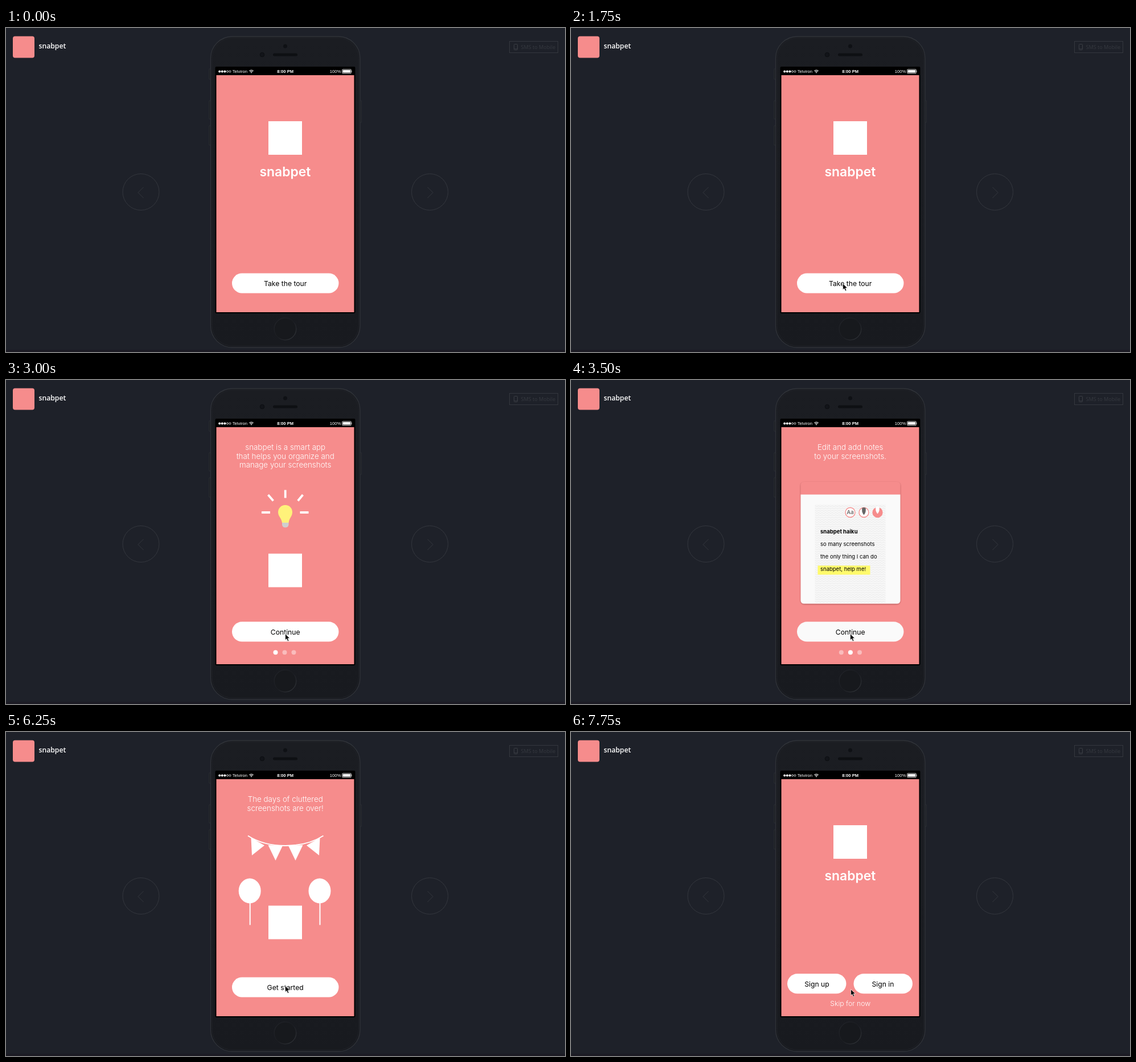
Write an HTML page that moves like this. It is 982x570 px and loops after 8 s.

```html
<!DOCTYPE html>
<html lang="en">
<head>
<meta charset="utf-8">
<title>App tour prototype</title>
<style>
  html, body { margin: 0; width: 100%; height: 100%; overflow: hidden; background: #1e2129; }
  svg { display: block; width: 100%; height: 100%; }

  .label { font: 600 12.2px "Open Sans", sans-serif; fill: #fff; }
  .faint { font: 9.1px "Open Sans", sans-serif; fill: #373a41; }
  .status { font: 7.6px "Liberation Sans", Arial, sans-serif; fill: #fff; }
  .mid { text-anchor: middle; }
  .title, .lead, .btn, .note { font-family: Inter, Montserrat, sans-serif; }
  .title { font-size: 22.9px; font-weight: 600; fill: #fff; text-anchor: middle; }
  .lead { font-size: 13.4px; font-weight: 300; fill: #fff; text-anchor: middle; }
  .btn { font-size: 12.2px; fill: #000; text-anchor: middle; }
  .note { font-size: 9.5px; fill: #000; }
  .bold { font-weight: 700; }

  .outline { fill: none; stroke: #34373e; }
  .white { fill: #fff; }
  .pink { fill: #f68c8c; }
  .paper { fill: #fafafa; }
  .pale { fill: #fff; opacity: .42; }

  .screen, #cursor { animation: 8s step-end infinite; }
  .screen { visibility: hidden; }
  #welcome { animation-name: welcome; }
  #smart { animation-name: smart; }
  #edit { animation-name: edit; }
  #search { animation-name: search; }
  #party { animation-name: party; }
  #sign { animation-name: sign; }
  #cursor { animation-name: cursor; }

  @keyframes welcome { 0% { visibility: visible } 28.125%, 100% { visibility: hidden } }
  @keyframes smart { 0% { visibility: hidden } 28.125% { visibility: visible } 43.75%, 100% { visibility: hidden } }
  @keyframes edit { 0% { visibility: hidden } 43.75% { visibility: visible } 62.5%, 100% { visibility: hidden } }
  @keyframes search { 0% { visibility: hidden } 62.5% { visibility: visible } 78.125%, 100% { visibility: hidden } }
  @keyframes party { 0% { visibility: hidden } 78.125% { visibility: visible } 96.875%, 100% { visibility: hidden } }
  @keyframes sign { 0% { visibility: hidden } 96.875%, 100% { visibility: visible } }

  /* The pointer is sampled four times a second. */
  @keyframes cursor {
    0% { transform: translate(-30px, -30px) }
    3.125% { transform: translate(819px, 288px) }
    6.25% { transform: translate(750px, 393px) }
    9.375% { transform: translate(601px, 425px) }
    12.5% { transform: translate(502px, 466px) }
    15.625% { transform: translate(482px, 453px) }
    18.75% { transform: translate(482px, 455px) }
    21.875% { transform: translate(477px, 449px) }
    28.125% { transform: translate(487px, 452px) }
    31.25% { transform: translate(488px, 450px) }
    34.375% { transform: translate(489px, 446px) }
    37.5% { transform: translate(490px, 446px) }
    84.375% { transform: translate(490px, 451px) }
    87.5%, 100% { transform: translate(491px, 452px) }
  }
</style>
</head>
<body>
<svg viewBox="0 0 982 570" preserveAspectRatio="none">
  <defs>
    <linearGradient id="body" x2="0" y2="1">
      <stop offset="0" stop-color="#1b1d22"/>
      <stop offset=".5" stop-color="#1a1c21"/>
      <stop offset="1" stop-color="#181a1f"/>
    </linearGradient>
    <linearGradient id="ring" x2="1" y2="1">
      <stop offset="0" stop-color="#24262b"/>
      <stop offset=".5" stop-color="#1b1d22"/>
      <stop offset="1" stop-color="#35383d"/>
    </linearGradient>
    <pattern id="weave" width="6" height="4" patternUnits="userSpaceOnUse">
      <rect width="6" height="4" fill="#f7f7f7"/>
      <path d="M0 3L3 1L6 3" fill="none" stroke="#ececec"/>
    </pattern>
    <filter id="shadow" x="-10%" y="-10%" width="120%" height="120%">
      <feDropShadow dx="0" dy="1" stdDeviation="1.2" flood-color="#5a2020" flood-opacity=".55"/>
    </filter>
    <rect id="pill" x="397" y="431.5" width="187.5" height="35" rx="17.5"/>
    <rect id="badge" x="461" y="164" width="59" height="59" fill="#fff"/>
    <path id="nib" d="M-3 -8Q0 -9.5 3 -8Q4.6 -1 0 4.500Q-4.600 -1 -3 -8Z"/>
    <g id="balloon" class="white">
      <ellipse cx="0" cy="279.5" rx="19.500" ry="22"/>
      <rect x="-.5" y="300" width="2" height="39.500"/>
    </g>
    <g id="half">
      <path d="M430.500 186L454 199.500L432 217Z"/>
      <path d="M460.500 199L486 200L473.500 226Z"/>
    </g>
    <g id="card">
      <rect class="pink" x="403.500" y="179" width="175" height="214.500" rx="6" filter="url(#shadow)"/>
    </g>
  </defs>

  <rect width="982" height="570" fill="#1e2129"/>
  <rect y="566" width="982" height="4" fill="#1c1b24"/>

  <!-- Page controls -->
  <rect class="pink" x="12" y="14.500" width="38" height="38" rx="4"/>
  <text class="label" x="57.500" y="36">snabpet</text>
  <g class="outline">
    <rect x="884.500" y="23.500" width="85" height="20"/>
    <rect x="892.500" y="28.500" width="6" height="10" rx="1" stroke="#3b3e45"/>
    <path d="M893 36.500h5"/>
    <circle cx="237" cy="288.500" r="32"/>
    <path d="M241.500 280L232 289.500L241.500 299"/>
    <circle cx="744.500" cy="288.500" r="32"/>
    <path d="M740.500 280L750 289.500L740.500 299"/>
  </g>
  <text class="faint" x="904.500" y="37">SMS to Mobile</text>

  <!-- Phone -->
  <g fill="#1b1d22" stroke="#2b2e34">
    <path d="M359 72h-2v18h2M359 128h-2v32h2M359 172h-2v34h2M622.500 128h2v38h-2"/>
    <rect x="359.500" y="15" width="262.500" height="547" rx="38" fill="url(#body)" stroke="#303339" stroke-width="1.300"/>
    <rect x="362" y="17.500" width="257.500" height="542" rx="36" fill="none" stroke="#202228"/>
  </g>
  <circle cx="490.500" cy="32" r="3.500" fill="#0f1115"/>
  <circle cx="450" cy="47" r="3.800" fill="#121419" stroke="#0c0e11"/>
  <rect x="469" y="44.500" width="43" height="5" rx="2.500" fill="#0e1013"/>
  <circle cx="490.500" cy="529.500" r="19.300" fill="#17191d" stroke="url(#ring)" stroke-width="1.300"/>
  <rect x="367.500" y="68" width="246" height="434" rx="2"/>
  <rect class="pink" x="369.500" y="83" width="242" height="417"/>

  <!-- Status bar -->
  <g class="white">
    <circle cx="375.200" cy="76.500" r="2"/>
    <circle cx="379.800" cy="76.500" r="2"/>
    <circle cx="384.400" cy="76.500" r="2"/>
    <path d="M431 79.300m-1.300-1.300a1.900 1.900 0 0 1 2.600 0l-1.300 1.600z"/>
  </g>
  <g fill="none" stroke="#fff" stroke-width=".8">
    <circle cx="389" cy="76.500" r="1.600"/>
    <circle cx="393.400" cy="76.500" r="1.600"/>
    <path d="M427.500 75.500a5 5 0 0 1 7 0M428.800 77a3.200 3.200 0 0 1 4.400 0" stroke-width="1.100"/>
    <rect x="590.500" y="72.800" width="16" height="7" rx="1.500"/>
  </g>
  <rect class="white" x="591.700" y="74" width="13.600" height="4.600" rx=".6"/>
  <path class="white" d="M607.300 75q1.400 1.300 0 2.600z"/>
  <text class="status" x="397.800" y="79.300">Telviron</text>
  <text class="status bold mid" x="490.700" y="79.300">8:00 PM</text>
  <text class="status" x="568.800" y="79.300">100%</text>

  <g class="screen" id="welcome">
    <use href="#badge"/>
    <text class="title" x="490.500" y="260.500">snabpet</text>
    <use href="#pill" class="white"/>
    <text class="btn" x="490.700" y="454.300">Take the tour</text>
  </g>

  <g class="screen" id="smart">
    <text class="lead"><tspan x="490.700" y="123">snabpet is a smart app</tspan><tspan x="490.700" y="138.500">that helps you organize and</tspan><tspan x="490.700" y="154">manage your screenshots</tspan></text>
    <path d="M490.700 193.500V207.500M460.500 202L469.500 212.500M521.500 202L512.800 212.500M449 233h15M516.500 233h15" stroke="#fff" stroke-width="3.800"/>
    <path d="M485 248h11.500v7q-1 4.500-5.700 4.500q-4.800 0-5.800-4.500z" fill="#cfcfcf"/>
    <path d="M490.500 220C498 220 503 225.500 503 232.500C503 240 497.500 243 496.500 251H485C484 243 478 240 478 232.500C478 225.500 483.500 220 490.500 220Z" fill="#fff27a"/>
    <use href="#badge" y="141.500"/>
    <use href="#pill" class="white" y="-6.200"/>
    <text class="btn" x="490.700" y="448">Continue</text>
    <circle class="white" cx="473.500" cy="479.200" r="4"/>
    <circle class="pale" cx="489.500" cy="479.200" r="4"/>
    <circle class="pale" cx="505.500" cy="479.200" r="4"/>
  </g>

  <g class="screen" id="edit">
    <text class="lead"><tspan x="490.700" y="123">Edit and add notes</tspan><tspan x="490.700" y="138.500">to your screenshots.</tspan></text>
    <use href="#card"/>
    <path class="paper" d="M403.500 201.500h175v186q0 6-6 6h-163q-6 0-6-6z"/>
    <rect x="428.500" y="219" width="124" height="173" fill="url(#weave)"/>
    <g stroke="#f68c8c" stroke-width="1.300" fill="#fff">
      <circle cx="490.500" cy="233" r="8.500"/>
      <circle cx="514.500" cy="233" r="8.500"/>
      <circle cx="538.500" cy="233" r="8.500" fill="#f68c8c"/>
    </g>
    <text class="note bold mid" x="490.500" y="236.300" style="fill:#777">Aa</text>
    <use href="#nib" x="514.500" y="233" fill="#666"/>
    <use href="#nib" x="538.500" y="231" fill="#fff"/>
    <rect x="433.500" y="326.500" width="92" height="16" fill="#fffa6b"/>
    <text class="note"><tspan class="bold" x="438" y="269.500">snabpet haiku</tspan><tspan x="438" y="292">so many screenshots</tspan><tspan x="438" y="314">the only thing I can do</tspan><tspan x="438" y="335.500">snabpet, help me!</tspan></text>
    <use href="#pill" class="paper" y="-6.200"/>
    <text class="btn" x="490.700" y="448">Continue</text>
    <circle class="pale" cx="474.800" cy="479.200" r="4"/>
    <circle class="white" cx="490.900" cy="479.200" r="4"/>
    <circle class="pale" cx="507" cy="479.200" r="4"/>
  </g>

  <g class="screen" id="search">
    <text class="lead"><tspan x="490.700" y="123">Search through your</tspan><tspan x="490.700" y="138.500">screenshots quickly</tspan><tspan x="490.700" y="154">and with ease.</tspan></text>
    <use href="#card"/>
    <path class="paper" d="M403.500 222h175v165.500q0 6-6 6h-163q-6 0-6-6z"/>
    <rect class="paper" x="414" y="194" width="155" height="17" stroke="#b98080" stroke-width=".7"/>
    <rect x="428.500" y="242" width="124.500" height="151" fill="url(#weave)"/>
    <text class="note"><tspan class="bold" x="420" y="205.800">haiku</tspan><tspan class="bold" x="438" y="287.500">snabpet haiku</tspan><tspan x="438" y="310">so many screenshots</tspan><tspan x="438" y="332">the only thing I can do</tspan><tspan x="438" y="353.500">snabpet, help me!</tspan></text>
    <use href="#pill" class="paper" y="-7"/>
    <text class="btn" x="490.700" y="447.300">Continue</text>
    <circle class="pale" cx="474.800" cy="479.200" r="4"/>
    <circle class="pale" cx="490.900" cy="479.200" r="4"/>
    <circle class="white" cx="507" cy="479.200" r="4"/>
  </g>

  <g class="screen" id="party">
    <text class="lead"><tspan x="490.700" y="123">The days of cluttered</tspan><tspan x="490.700" y="138.500">screenshots are over!</tspan></text>
    <path d="M425 182.500Q452 200 491 200T557.500 182.500" fill="none" stroke="#fff" stroke-width="2"/>
    <use href="#half" class="white"/>
    <use href="#half" class="white" transform="matrix(-1 0 0 1 982 0)"/>
    <use href="#balloon" x="428.200"/>
    <use href="#balloon" x="551"/>
    <use href="#badge" y="141.500"/>
    <use href="#pill" class="white"/>
    <text class="btn" x="490.700" y="454.300">Get started</text>
  </g>

  <g class="screen" id="sign">
    <use href="#badge"/>
    <text class="title" x="490.500" y="260.500">snabpet</text>
    <rect class="white" x="380" y="425.300" width="103.500" height="35" rx="17.500"/>
    <rect class="white" x="496.500" y="425.300" width="103.500" height="35" rx="17.500"/>
    <text class="btn" x="432" y="448">Sign up</text>
    <text class="btn" x="548" y="448">Sign in</text>
    <text class="lead" x="490.700" y="482" style="font-size:12.2px">Skip for now</text>
  </g>

  <path id="cursor" d="M.6 .7V11.600L3.100 9.300L4.900 13.500L6.900 12.700L5.100 8.600H8.600Z" fill="#000" stroke="#fff" stroke-width=".7"/>
</svg>
</body>
</html>
```
